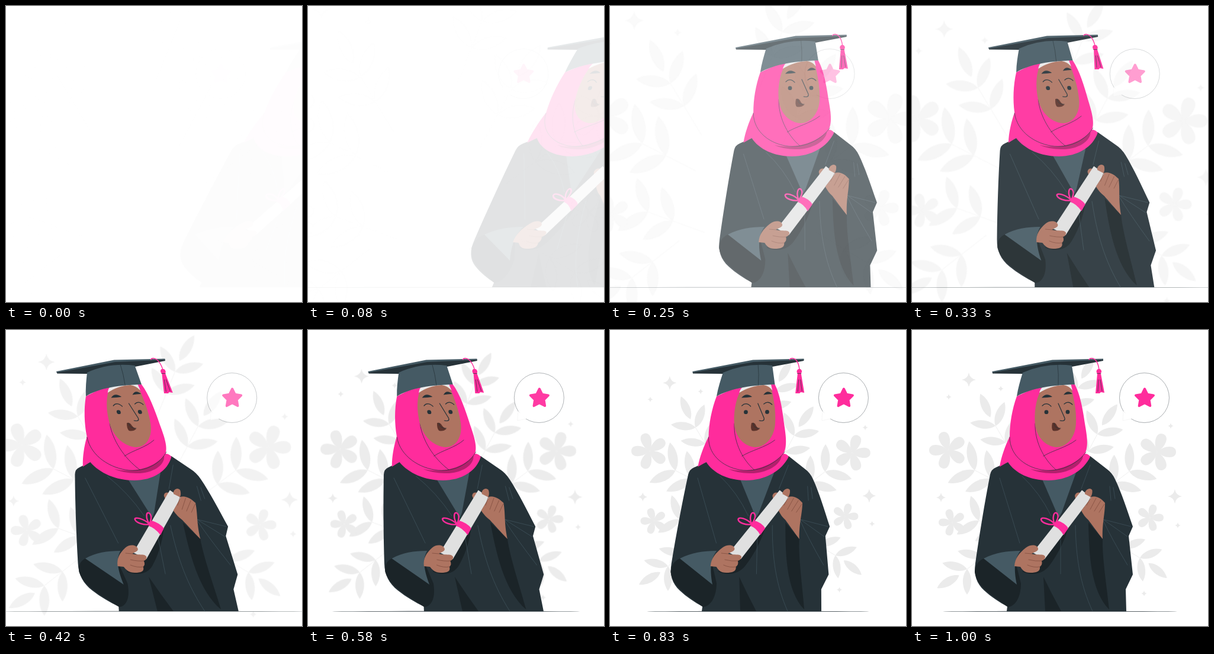
Animation, 500 px wide and 500 px high, one loop 1.04 s. Source, as an HTML page:

```html
<!DOCTYPE html>
<html lang="en">
<head>
<meta charset="utf-8">
<title>Graduate</title>
<style>
  html, body { margin: 0; width: 100%; height: 100%; overflow: hidden; background: #fff; }
  svg { display: block; width: 100vw; height: 100vh; }
  .pink { fill: #ff2c9c; }
  .dark { fill: #263238; }
  .slate { fill: #455a64; }
  .shade { fill: #1b2428; }
  .skin { fill: #ae7461; }
  .line, .seam, .crease, .bow { fill: none; stroke-linecap: round; }
  .line { stroke: #263238; stroke-width: .7; }
  .seam { stroke: #455a64; stroke-width: .6; }
  .crease { stroke: #7d4a3c; stroke-width: .7; }
  .bow { stroke: #ff2c9c; stroke-width: 2.4; }
  .face { stroke-width: 1.2; }
  .cord { stroke-width: 1.4; }
</style>
</head>
<body>
<svg viewBox="0 0 500 500">
  <g id="plants" fill="#ebebeb"></g>
  <ellipse id="floor" cx="250" cy="475.3" rx="198" ry=".5" fill="#263238"/>

  <g id="bubble">
    <circle cx="392.5" cy="114.5" r="42" fill="#fff" stroke="#263238" stroke-width=".4"/>
    <path d="M357 137 L356 153 L371 150" fill="#fff" stroke="#e8e8e8" stroke-width=".4"/>
    <path id="star" class="pink" stroke="#ff2c9c" stroke-width="4" stroke-linejoin="round"/>
  </g>

  <g id="graduate">
    <!-- robe -->
    <path class="dark" d="M162 223 L142 232 Q134 235 132 244 C123 290 114 345 107 394 C104 414 109 428 122 440 C134 451 148 460 161 467 L160 475 H362 L361 438 L373 413 L366 348 L373 332 C363 303 354 275 343 252 Q338 241 328 234 L301 213 Z"/>
    <path class="slate" d="M219 250 L248 317 L253 308 L277 241 Z"/>
    <path class="shade" d="M222 417 Q236 446 252 475 H225 Z"/>
    <path class="shade" d="M298 325 C299 375 301 440 333 472 C329 432 321 384 322 353 Z"/>
    <path class="shade" d="M264 334 C256 362 242 385 232 398 C222 412 202 416 186 408 L214 392 Z"/>
    <path class="shade" d="M121 386 C110 391 106 400 106 409 C110 435 138 450 162 468 C173 467 184 454 184 428 L176 396 Z"/>
    <path class="slate" d="M121 386 C141 376 160 373 183 373 C174 385 171 400 177 430 Z"/>
    <path class="seam" d="M148 250 L182 360 M186 247 Q216 275 235 314 M251 345 V412 M276 330 C277 385 284 430 305 475 M301 228 L286 268"/>
    <path class="seam" d="M370 332 L323 320 L364 349 M323 322 Q337 352 364 397 M334 264 L336 288 M340 266 L343 285"/>

    <!-- hijab -->
    <path class="pink" d="M165 180 C157 197 151 213 148 231 L162 223 C174 242 200 254 230 254 C262 254 290 238 301 214 Q298 209 292 209 C299 196 295 176 292 158 C289 136 284 108 275 92 L216 94 L177 112 C169 134 165 158 165 180 Z"/>
    <path fill="#b3206d" d="M200 235 C235 243 270 231 289 212 C288 229 262 243 235 242 Q216 242 200 235 Z"/>
    <path class="line" d="M165 181 C165 214 195 234 225 237 C255 239 280 225 294 206 M208 158 C207 185 220 216 243 236 M222 213 C238 203 260 199 277 186"/>

    <!-- face -->
    <path class="skin" d="M216 105 C228 97 245 92 264 92 L270 100 C273 116 278 135 277 156 C277 180 262 198 245 198 C225 197 211 181 208 160 C206 140 209 120 216 105 Z"/>
    <path fill="#ebebeb" d="M215 106 Q217 99 221 96 C238 90 255 89 268 90 L271 102 Q265 94 256 93 C240 94 228 98 215 106 Z"/>
    <path class="dark" d="M219 114.500 Q227 105 237 113 Q229 114 219 114.500 Z M256 109.500 Q263 100 271 108 Q264 108 256 109.500 Z"/>
    <path class="line face" d="M220 128 Q227 121 235 129 M257 125 Q264 119 271 126 M247 124 L258 149 Q259 155 250 153"/>
    <circle class="dark" cx="227" cy="138.7" r="3.4"/>
    <circle class="dark" cx="263" cy="138.4" r="3.4"/>
    <path fill="#5b332b" d="M237 157 Q242 156 244 160 Q246 165 251 167 Q245 172 238 170 Q235 166 237 157 Z"/>
    <path class="line" d="M240 157 Q240 167 251 166"/>

    <!-- cap -->
    <path class="dark" d="M136 71 L237 52 L323 49 V52 L270 62 L187 74 L136 73.500 Z"/>
    <path class="slate" d="M187 72 C183 85 179 98 177 112 C196 101 228 93 275 92 L270 60 Q226 55 187 72 Z"/>
    <path class="slate" d="M135.500 70 L237 50.500 L323 48.500 V50.500 L238 54 L135.500 72 Z"/>
    <path class="line" d="M246 59 Q248 75 247 93"/>
    <path class="bow cord" d="M299 50 C302 46 308 48 311 52 Q315 58 316 67"/>
    <circle class="pink" cx="315.8" cy="70" r="4.3"/>
    <path class="pink" d="M313 74 H319 L325 106 L319 105 L317 107 L310 107 Z"/>
    <path class="line" d="M312.500 73.500 H319 M315 84 L314 104 M318 84 L321 103"/>

    <!-- scroll and hands -->
    <path class="skin" d="M275 280 Q277 273 285 275 L286 284 L277 289 Z"/>
    <path fill="#e0e0e0" d="M287 270.500 L303 283 L224 387 L204 376 Z"/>
    <path class="pink" d="M246 322 Q259 326 264 335 L256 346.500 Q249 334 239 331 Z"/>
    <path class="bow" d="M241 328 C233 318 218 315 218 320 C219 326 232 330 241 328 C236 316 240 307 244 309 C249 313 245 322 241 328"/>
    <path class="skin" d="M292 277 C292 269 302 265 304.500 271 Q305 277 302 282 C312 279 320 285 326 292 C326 312 321 325 322 353 C312 340 304 329 298 321 Q290 314 286 305 L303 283 Z"/>
    <path class="crease" d="M302 282 L295 296 M311 284 L301 303 M319 288 L308 306 M325 294 L316 308"/>
    <path class="skin" d="M173 399 C174 385 181 377 192 368 C200 362 211 362 213 369 C214 374 206 375 202 378 C210 381 223 377 225 383 Q225 388 219 390 Q221 396 216 400 C217 408 210 410 200 410 C190 410 186 405 183 400 Z"/>
    <path class="crease" d="M202 378 L191 377 M219 390 Q209 391 197 388 M216 400 Q206 402 195 397"/>
  </g>
</svg>
<script>
const $ = id => document.getElementById(id);
const rad = deg => deg * Math.PI / 180;
const plants = $('plants');
const shape = (d, x, y, turn = 0) => `<path d="${d}" transform="translate(${x} ${y}) rotate(${turn})"/>`;

function leaf(len) {
  const w = len * .22;
  return `M0 0 C${len * .25} ${-w} ${len * .7} ${-w} ${len} 0 C${len * .7} ${w} ${len * .25} ${w} 0 0Z`;
}

// A stem with two pairs of leaves, and one more leaf at the end of some.
function branch(x, y, turn, len, hasTip) {
  const at = d => [x + d * Math.cos(rad(turn)), y + d * Math.sin(rad(turn))];
  const [ex, ey] = at(-75);
  let out = `<path d="M${x} ${y} L${ex} ${ey}" stroke="#ebebeb" stroke-width=".8"/>`;
  for (const back of [0, -33])
    for (const side of [-52, 52]) out += shape(leaf(len), ...at(back), turn + side);
  return hasTip ? out + shape(leaf(len), ...at(17), turn + 8) : out;
}

function flower(x, y, r, turn) {
  const w = r * .34;
  const petal = `M0 0 C${r * .35} ${-w} ${r} ${-w * 1.2} ${r} 0 C${r} ${w * 1.2} ${r * .35} ${w} 0 0Z`;
  return Array.from({ length: 5 }, (_, i) => shape(petal, x, y, turn + i * 72)).join('');
}

function sparkle(x, y, r) {
  const q = r * .15;
  return shape(`M0 ${-r} Q${q} ${-q} ${r} 0 Q${q} ${q} 0 ${r} Q${-q} ${q} ${-r} 0 Q${-q} ${-q} 0 ${-r}Z`, x, y);
}

plants.innerHTML = [
  branch(141, 162, -121, 43, true), branch(106, 237, -153, 50),
  branch(113, 322, -160, 44), branch(93, 404, 142, 43, true),
  branch(280, 98, -68, 42, true), branch(313, 176, -62, 44, true),
  branch(367, 239, -37, 48), branch(385, 385, 31, 40, true),
  flower(61, 203, 32, 180), flower(68, 325, 23, 180),
  flower(414, 206, 32, 0), flower(402, 317, 23, 0),
  sparkle(96, 84, 12), sparkle(49, 283, 8), sparkle(444, 281, 12),
  ...[[62, 113], [150, 99], [437, 162], [449, 330], [392, 445]].map(([x, y]) => sparkle(x, y, 5))
].join('');

$('star').setAttribute('d', 'M' + Array.from({ length: 10 }, (_, i) => {
  const r = i % 2 ? 8 : 15.8, a = rad(i * 36 - 90);
  return `${393 + r * Math.cos(a)} ${115.3 + r * Math.sin(a)}`;
}).join('L') + 'Z');

// cubic-bezier(.36, -.01, .5, 1.38)
const curve = (a, b, u) => 3 * a * u * (1 - u) ** 2 + 3 * b * u * u * (1 - u) + u ** 3;
function ease(x) {
  if (x <= 0) return 0;
  if (x >= 1) return 1;
  let lo = 0, hi = 1;
  for (let i = 0; i < 30; i++) {
    const mid = (lo + hi) / 2;
    if (curve(.36, .5, mid) < x) lo = mid; else hi = mid;
  }
  return curve(-.01, 1.38, lo);
}

const poses = [
  { at: 0, shift: 250, skew: -20, alpha: 0 },
  { at: 600, shift: -3, skew: 10, alpha: 1 },
  { at: 800, shift: 0, skew: -2, alpha: 1 },
  { at: 1000, shift: 0, skew: 0, alpha: 1 }
];
function poseAt(t) {
  const i = Math.max(1, poses.findIndex(p => p.at > t));
  const b = t >= 1000 ? poses[3] : poses[i], a = poses[poses.indexOf(b) - 1];
  const p = ease((t - a.at) / (b.at - a.at));
  const mix = (from, to) => from + (to - from) * p;
  return {
    shift: mix(a.shift, b.shift),
    slope: mix(Math.tan(rad(a.skew)), Math.tan(rad(b.skew))),
    alpha: mix(a.alpha, b.alpha)
  };
}

const LOOP = 1040, FPS = 24;
const clamp = v => Math.max(0, Math.min(1, v));
// The picture advances in steps and rests on the first one for two.
function sceneTime(ms) {
  const step = Math.floor((ms + 5) * FPS / 1000);
  return step < 2 ? 38 : step * 1000 / FPS + 31;
}

function render(ms) {
  const t = sceneTime(ms);
  const { shift, slope, alpha } = poseAt(t);
  $('graduate').setAttribute('transform', `matrix(1 0 ${slope} 1 ${shift - 250 * slope} 0)`);
  $('graduate').setAttribute('opacity', clamp(alpha));

  const p = ease(t / 1000), rest = 1 - p;
  plants.setAttribute('transform', `translate(250 250) scale(${1 + .5 * rest}) translate(-250 -250)`);
  $('bubble').setAttribute('transform', `translate(${-30 * rest} 0)`);
  $('floor').setAttribute('rx', 198 * (1 + .8 * rest));
  for (const id of ['plants', 'bubble', 'floor']) $(id).setAttribute('opacity', clamp(p));
}

const start = performance.now();
function tick() {
  render((performance.now() - start) % LOOP);
  requestAnimationFrame(tick);
}
tick();
</script>
</body>
</html>
```
